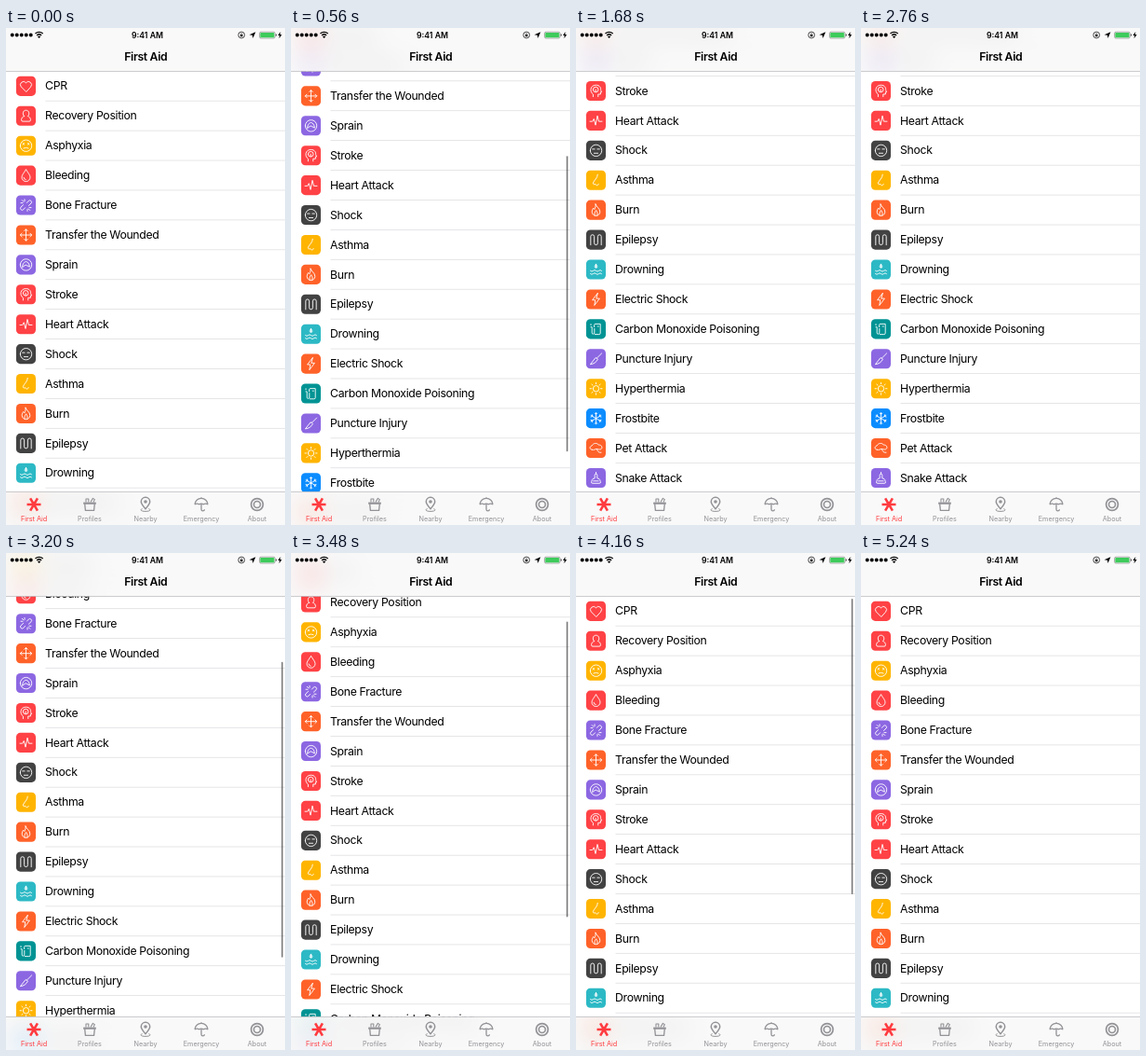
These frames come from a looping animation (300 by 533 pixels, 5.28 s). An HTML page:

```html
<!DOCTYPE html>
<html lang="en">
<head>
<meta charset="utf-8">
<title>First Aid</title>
<style>
  html, body { margin: 0; width: 100%; height: 100%; overflow: hidden; background: #fff; }
  svg { display: block; font-family: Inter, Roboto, sans-serif; }
  .row { font-size: 12.3px; letter-spacing: -.36px; }
  .icon { fill: none; stroke: #fff; stroke-width: .9; stroke-linecap: round; stroke-linejoin: round; }
  .tab { font-size: 7.25px; text-anchor: middle; }
</style>
</head>
<body>
<svg width="300" height="533">
  <defs>
    <filter id="frost" filterUnits="userSpaceOnUse" x="-40" y="-40" width="380" height="613" color-interpolation-filters="sRGB">
      <feGaussianBlur stdDeviation="13"/>
    </filter>
    <clipPath id="navArea"><path d="M0 0H300V46H0z"/></clipPath>
    <clipPath id="tabArea"><path d="M0 497.5H300V533H0z"/></clipPath>
  </defs>
  <g id="list"></g>
  <rect id="thumb" x="295.9" width="2.1" rx="1" fill="#000" fill-opacity=".4"/>
  <g id="bars"></g>
  <g id="status">
    <path d="M6.7 7.5h.01M11.7 7.5h.01M16.7 7.5h.01M21.7 7.5h.01M26.7 7.5h.01" stroke="#000" stroke-width="4" stroke-linecap="round"/>
    <path d="M31.5 6a6 6 0 0 1 8.2 0M33.1 7.9a3.7 3.7 0 0 1 5 0" fill="none" stroke="#000" stroke-width="1.3"/>
    <path d="M35.6 11l-1.6-1.7a2.3 2.3 0 0 1 3.2 0z"/>
    <text x="152" y="10.9" font-size="8.7" font-weight="600" text-anchor="middle">9:41 AM</text>
    <circle cx="253.2" cy="7.5" r="3.4" fill="none" stroke="#000" stroke-width=".7"/>
    <path d="M251.9 7.3h2.6v1.9h-2.6z"/>
    <path d="M252.4 7.3v-.7a.8.8 0 0 1 1.6 0v.7" fill="none" stroke="#000" stroke-width=".5"/>
    <path d="M268.4 4.3l-2.9 6.8-.6-3.3-3.3-.6z"/>
    <rect x="272.6" y="4.2" width="16.6" height="6.8" rx="1.5" fill="#fff" stroke="#555" stroke-width=".5"/>
    <rect x="273.3" y="4.9" width="15.2" height="5.4" rx=".9" fill="#3ecb5b"/>
    <path d="M290 6.3a1.5 1.5 0 0 1 0 2.6z"/>
    <path d="M295.3 4l-3 4.1h1.9l-.6 3.1 3-4.1h-1.9z"/>
  </g>
  <text x="150.3" y="34.9" font-size="12.3" font-weight="600" letter-spacing="-.36" text-anchor="middle">First Aid</text>
  <g id="tabItems"></g>
</svg>
<script>
const RED = '#ff4245', YELLOW = '#ffb400', PURPLE = '#8c67e2', ORANGE = '#ff6229',
      DARK = '#424242', AQUA = '#2cb9c5', TEAL = '#009394', BLUE = '#0b8cff', GRAY = '#929297';
const ROW = 31.92, TOP = 46.3, MAX = 218.3, LOOP = 5280, RETURN = 2800;

const ring = (x, y, r) => `M${x - r} ${y}a${r} ${r} 0 1 0 ${2 * r} 0a${r} ${r} 0 1 0 ${-2 * r} 0`;
const face = ring(10.5, 10.5, 6.2);
// Line copied around the icon centre at equal angles
const spokes = (n, line) => Array.from({ length: n }, (_, i) => {
  const c = Math.cos(i * 2 * Math.PI / n), s = Math.sin(i * 2 * Math.PI / n);
  const at = ([x, y]) => `${(10.5 + x * c - y * s).toFixed(2)} ${(10.5 + x * s + y * c).toFixed(2)}`;
  return 'M' + line.map(at).join('L');
}).join('');

const rows = [
  ['CPR', RED, 'M10.5 16.3L5.2 11A3.2 3.2 0 0 1 10.5 6.9A3.2 3.2 0 0 1 15.8 11Z'],
  ['Recovery Position', RED, 'M8.6 10.8C6.4 9.2 6.8 4.4 10.5 4.4S14.6 9.2 12.4 10.8C14.6 11.4 15.4 12.8 15.4 15Q15.4 16.3 14 16.3H7Q5.6 16.3 5.6 15C5.6 12.8 6.4 11.4 8.6 10.8'],
  ['Asphyxia', YELLOW, face + 'M7 7.9l1.6 1.4M8.6 7.9L7 9.3M12.4 7.9l1.6 1.4M14 7.9l-1.6 1.4M7.9 13.2Q10.5 12 13.1 13.2'],
  ['Bleeding', RED, 'M10.5 4.2C8 8 6 10.2 6 12.4a4.5 4.5 0 0 0 9 0C15 10.2 13 8 10.5 4.2M8 12.6a2.5 2.5 0 0 0 2.2 2.3'],
  ['Bone Fracture', PURPLE, 'M9.5 13.2l-1.7 1.9a1.8 1.8 0 0 1-2.8-2.6l2.6-2.4M11.5 7.8l1.7-1.9A1.8 1.8 0 0 1 16 8.5l-2.6 2.4M6.2 5l1.7 1.7M9 4.2v1.9M5 8h2M14.8 16l-1.7-1.7M12 16.8v-1.9M16 13h-2'],
  ['Transfer the Wounded', ORANGE, spokes(4, [[0, 0], [0, -6.2], [-1.8, -4.4]]) + spokes(4, [[0, -6.2], [1.8, -4.4]])],
  ['Sprain', PURPLE, face + 'M6.6 12.8C7 9 8.8 7.2 10.5 7.2S14 9 14.4 12.8L10.5 10.8Z'],
  ['Stroke', RED, 'M7.4 16.6v-2.6C3.6 11.6 4 4.2 10.4 4.2C14.8 4.2 15.8 7.4 15.6 9.4L16.6 11.7H15.4V14H12.8V16.6' + ring(10.2, 9, 2.8) + 'M10.2 9v2.6'],
  ['Heart Attack', RED, 'M4 11.2h2.8l1.4-2.7 1.8 6.7 2-10 1.5 6h3.5'],
  ['Shock', DARK, face + 'M6.7 9h2.4M11.9 9h2.4M8.4 13.4h4.2'],
  ['Asthma', YELLOW, 'M12.3 4.3C12.3 8.2 8.4 10.4 7.4 13.3C7 15 8.8 15.4 9.8 14.6C10.7 16.6 13 16.4 13.2 14.5'],
  ['Burn', ORANGE, 'M10 4.2C10.8 7.4 14.8 8.5 14.8 12.4A4.3 4.3 0 0 1 6.2 12.4C6.2 10.7 7 9.4 7.7 8.4L8.8 9.8C9.8 8.2 10.3 6.4 10 4.2M10.6 11C9 12.6 8.5 14.2 9.3 16.2M10.6 11C12.3 12.8 12.5 14.6 11.7 16.2'],
  ['Epilepsy', DARK, 'M4.8 16V7a1.9 1.9 0 0 1 3.8 0v7a1.9 1.9 0 0 0 3.8 0V7a1.9 1.9 0 0 1 3.8 0v9'],
  ['Drowning', AQUA, 'M10.5 4.6C9.5 6.1 9.2 6.7 9.2 7.4a1.3 1.3 0 0 0 2.6 0C11.8 6.7 11.5 6.1 10.5 4.6V8' + [11.8, 15].map(y => `M4.5 ${y}q1.5 1.5 3 0t3 0 3 0 3 0`).join('')],
  ['Electric Shock', ORANGE, 'M12.2 4L6.6 11.3H9.8L8.8 17L14.4 9.6H11.2Z'],
  ['Carbon Monoxide Poisoning', TEAL, 'M8.6 8.2V6.2a1.2 1.2 0 0 1 1.2-1.2h5.4v9.8a1.4 1.4 0 0 1-1.4 1.4H9.4M5 8.3h1.2v6.2a1.3 1.3 0 0 0 2.6 0V10M5 5.2v1M12.3 7.6h1'],
  ['Puncture Injury', PURPLE, 'M16.6 4.6L11.4 9.8L12.4 11C11 14 8 16 4.4 16.4L10 9.3L11.4 9.8'],
  ['Hyperthermia', YELLOW, ring(10.5, 10.5, 3.2) + spokes(8, [[0, -5], [0, -6.5]])],
  ['Frostbite', BLUE, spokes(6, [[0, 0], [0, -6.2]]) + spokes(6, [[-1.3, -5.6], [0, -4.3], [1.3, -5.6]])],
  ['Pet Attack', ORANGE, 'M6.2 12.2C3 11.6 3.6 8.6 6 8C7.4 4.8 12 4.6 13.2 7C16.9 6.8 18 10.3 15.8 11.6C14.4 12.4 12.8 11.4 11.2 11.4C9.2 11.4 8.8 13 6.2 12.2M11.6 11.6c.3 2.6 2 4 4.4 3.6'],
  ['Snake Attack', PURPLE, 'M6.6 16.3Q5.2 16.3 5.6 14.8L6.4 12.4Q6.8 11.4 8 11.2L9.2 10.8V7.4a1.3 1.3 0 0 1 2.6 0V10.8L13 11.2Q14.2 11.4 14.6 12.4L15.4 14.8Q15.8 16.3 14.4 16.3ZM7.6 13.8h5.6M10.5 6V4.4']
];

const $ = id => document.getElementById(id);
const list = $('list'), thumb = $('thumb');

list.innerHTML = rows.map(([name, color, d], i) => `
  <g transform="translate(0 ${TOP + i * ROW})">
    <rect x="10.9" y="5.5" width="21.1" height="21.1" rx="4.5" fill="${color}"/>
    <path class="icon" transform="translate(11 5.6)" d="${d}"/>
    <text class="row" x="42.1" y="20.2">${name}</text>
    <rect x="42.5" y="31.5" width="258" height=".8" fill="#dfdfe2"/>
  </g>`).join('');

// Frosted bars show a blurred copy of the rows beneath them
const bar = (area, y, h, edge) => `
  <g clip-path="url(#${area})">
    <rect y="${y}" width="300" height="${h}" fill="#fff"/>
    <g filter="url(#frost)"><g clip-path="url(#${area})"><use href="#list"/></g></g>
    <rect y="${y}" width="300" height="${h}" fill="#f7f7f7" fill-opacity=".76"/>
  </g>
  <rect y="${edge}" width="300" height=".8" fill="#c0c0c3"/>`;
$('bars').innerHTML = bar('navArea', 0, 46, 46) + bar('tabArea', 497, 36, 497);

const line = (d, w) => `<path d="${d}" fill="none" stroke="currentColor" stroke-width="${w}" stroke-linejoin="round"/>`;
const solid = d => `<path d="${d}" fill="currentColor" fill-rule="evenodd"/>`;
const tabs = [
  ['First Aid', line('M-7.5 0H7.5M-3.9 -6.6L3.9 6.6M3.9 -6.6L-3.9 6.6', 2.6)],
  ['Profiles', line('M-5.3 -.6L-4.6 6.4H4.6L5.3 -.6', 1.3) + solid('M-6.8 -2.4H6.8V-.2H-6.8Z') + line('M-4 -2.5V-6H-1.2V-2.5M1 -2.5L3.4 -6.6L5.4 -5.4L4 -2.5', 1.1)],
  ['Nearby', line('M0 4.8C-3 1.2 -4.7 -.8 -4.7 -3A4.7 4.7 0 0 1 4.7 -3C4.7 -.8 3 1.2 0 4.8Z', 1.5) + solid(ring(0, -3, 1.8)) + line('M-3.4 4.6C-7 6 -4 7.4 0 7.4S7 6 3.4 4.6', 1)],
  ['Emergency', line('M-6.8 -.2A6.8 6.4 0 0 1 6.8 -.2Q4.6 -1.4 2.4 -.2Q0 -1.4 -2.4 -.2Q-4.6 -1.4 -6.8 -.2ZM0 -6.5V-7.8', 1.3) + line('M0 -1V5.2a1.7 1.7 0 0 0 3.4 0', 1.3)],
  ['About', line(ring(0, 0, 6.4), 1.7) + line(ring(0, 0, 3.5), 1.6)]
];
$('tabItems').innerHTML = tabs.map(([name, art], i) => {
  const color = i ? GRAY : '#ff3b3f';
  return `<g transform="translate(${30 + 60 * i} 511)" color="${color}">${art}
    <text class="tab" y="18.3" fill="${color}">${name}</text></g>`;
}).join('');

// Distance travelled by one flick, with a small bounce at its end
const flick = [[0, 0], [100, 10], [200, 36], [300, 70], [400, 104], [520, 139], [680, 177],
  [800, 203], [880, 218.6], [940, 223.2], [1000, 222], [1060, 219.4], [1130, MAX]];

function travel(t) {
  const end = flick.length - 1;
  if (t <= 0) return 0;
  if (t >= flick[end][0]) return MAX;
  const i = flick.findIndex(p => p[0] > t) - 1;
  const [t0, a] = flick[i], [t1, b] = flick[i + 1], span = t1 - t0, u = (t - t0) / span;
  const slope = k => {
    if (k === 0 || k === end) return 0;
    return (flick[k + 1][1] - flick[k - 1][1]) / (flick[k + 1][0] - flick[k - 1][0]);
  };
  const v = u * u * (3 - 2 * u);
  return a + (b - a) * v + span * u * (1 - u) * (slope(i) * (1 - u) - slope(i + 1) * u);
}

function draw(now) {
  const t = Math.floor(now % LOOP / 40) * 40;
  const back = t >= RETURN, local = back ? t - RETURN : t;
  const moved = travel(local), scroll = back ? MAX - moved : moved;
  list.setAttribute('transform', `translate(0 ${-scroll})`);

  const inside = Math.max(0, Math.min(MAX, scroll));
  const over = Math.abs(scroll - inside);
  thumb.setAttribute('y', 49 + inside * .592 + (scroll > MAX ? over : 0));
  thumb.setAttribute('height', 317 - over);
  thumb.setAttribute('opacity', local > 0 ? Math.max(0, Math.min(1, (1640 - local) / 260)) : 0);
}

const start = performance.now();
function tick() {
  draw(performance.now() - start);
  requestAnimationFrame(tick);
}
tick();
</script>
</body>
</html>
```
